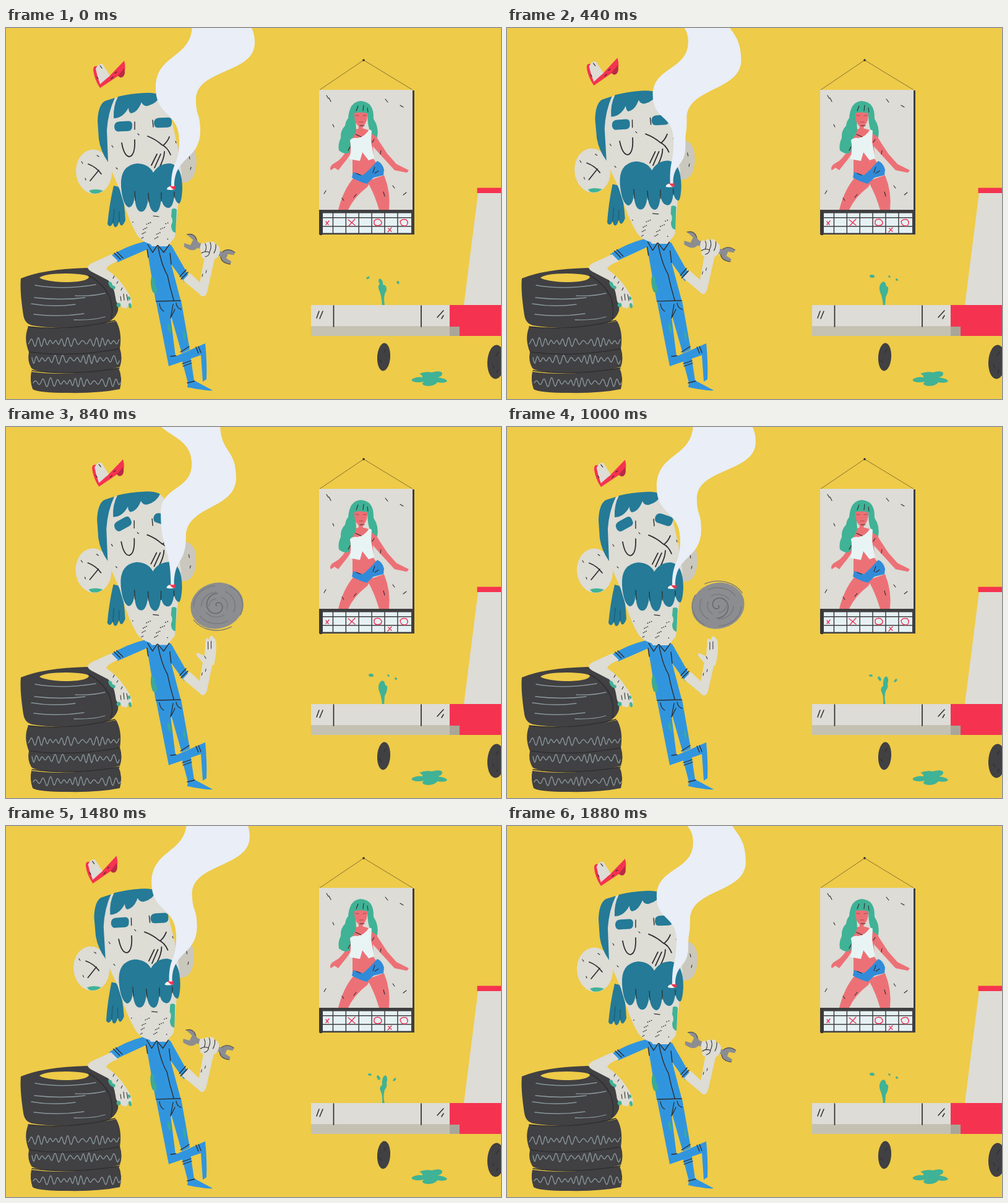
An HTML page with a canvas that plays this animation: 800x600 px, repeating every 1920 ms.

```html
<!DOCTYPE html>
<html lang="en">
<head>
<meta charset="utf-8">
<title>Garage break</title>
<style>
html, body { margin: 0; width: 100%; height: 100%; overflow: hidden; background: #eecb48; }
canvas { display: block; width: 800px; height: 600px; }
</style>
</head>
<body>
<canvas id="stage" width="800" height="600"></canvas>
<script>
const ctx = document.getElementById('stage').getContext('2d');
const LOOP = 1920, STEP = 40, LEAD = 8;
const BG = '#eecb48', INK = '#2e2d30', SKIN = '#dddcd5', HAIR = '#247a97', BLUE = '#3195de',
  RED = '#f53350', GREEN = '#40b296', TIRE = '#414042', CHALK = '#87969a', STEEL = '#8c8d90',
  SMOKE = '#e9eef7', PINK = '#ec7176', CELL = '#e6f1f3';

const fill = (c, d) => { ctx.fillStyle = c; ctx.fill(new Path2D(d)); };
const line = (c, w, d) => { ctx.strokeStyle = c; ctx.lineWidth = w; ctx.stroke(new Path2D(d)); };
const rect = (c, x, y, w, h) => { ctx.fillStyle = c; ctx.fillRect(x, y, w, h); };
function oval(c, x, y, rx, ry, a = 0) {
  ctx.fillStyle = c;
  ctx.beginPath();
  ctx.ellipse(x, y, rx, ry, a, 0, Math.PI * 2);
  ctx.fill();
}
function group(draw) { ctx.save(); draw(); ctx.restore(); }
function spin(x, y, a) { ctx.translate(x, y); ctx.rotate(a); ctx.translate(-x, -y); }

// keys: [time, ...values], eased between neighbours
function track(keys, t, smooth) {
  if (t <= keys[0][0]) return keys[0].slice(1);
  for (let i = 1; i < keys.length; i++) {
    const a = keys[i - 1], b = keys[i];
    if (t <= b[0]) {
      let u = (t - a[0]) / (b[0] - a[0]);
      if (smooth) u = u * u * (3 - 2 * u);
      return a.slice(1).map((v, j) => v + (b[j + 1] - v) * u);
    }
  }
  return keys[keys.length - 1].slice(1);
}

function squiggle(y, x0, x1, seed) {
  ctx.strokeStyle = CHALK;
  ctx.lineWidth = 1.4;
  ctx.beginPath();
  for (let x = x0; x <= x1; x++) {
    const amp = 5 + 2.5 * Math.sin(x * 0.13 + seed);
    ctx.lineTo(x, y + amp * Math.sin(x * 0.6 + 1.5 * Math.sin(x * 0.07 + seed)));
  }
  ctx.stroke();
}

function tires() {
  fill(TIRE, 'M41 556Q100 564 182 550Q189 566 184 584Q150 591 100 590Q52 590 43 584Q38 570 41 556Z');
  fill(TIRE, 'M36 483Q100 491 178 474Q188 492 184 518Q189 534 184 548Q150 558 100 558Q48 557 41 550Q34 538 37 524Q28 502 36 483Z');
  fill(TIRE, 'M24 405Q60 390 130 388Q150 390 165 407Q184 432 181 457Q176 475 150 481Q90 489 42 481Q30 478 28 464Q22 425 24 405Z');
  line('#2f2e30', 1.6, 'M36 483Q100 491 176 473M39 524Q105 533 183 519M42 554Q105 563 183 550');
  fill(BG, 'M54 404Q62 397 97 397Q134 398 134 403Q130 411 94 411Q65 410 54 404Z');
  line('#2f2e30', 1.5, 'M134 400Q158 414 168 436Q174 455 170 470');
  line(CHALK, 1.3, 'M47 416Q92 424 145 415M46 436Q90 441 128 436M112 433Q140 434 160 429M41 446Q75 452 112 447M45 463Q85 468 126 462M110 472Q140 473 160 467');
  squiggle(508, 36, 183, 1);
  squiggle(536, 42, 183, 3);
  squiggle(573, 44, 185, 5);
}

function calendar() {
  line('#7b6831', 0.9, 'M507 100L578 52L657 100');
  oval(INK, 578, 52, 1.8, 1.8);
  rect('#3f3e40', 507, 101, 153, 233);
  rect('#dddcd6', 506, 100, 151, 194);
  fill(PINK, 'M556 184Q551 202 538 214L527 221Q522 227 525 230L531 226L537 230L544 221Q558 205 563 190Z');
  fill(PINK, 'M562 242Q545 262 537 294L553 294Q562 274 584 257L590 246Z');
  fill(PINK, 'M588 246L611 238Q622 265 619 294L603 294Q596 270 586 252Z');
  fill(PINK, 'M586 164Q596 168 601 180L616 203L631 220L651 230L648 234L628 230L606 206L590 188Z');
  fill(PINK, 'M560 166Q575 158 592 168L594 212L600 220L580 245L560 236L560 208Z');
  fill(GREEN, 'M573 118Q555 119 553 146Q549 150 548 158Q540 166 541 178Q536 188 538 198Q548 206 555 201Q558 188 556 182Q563 176 566 165L565 146L584 138Q584 160 590 170L600 177Q603 160 594 147Q595 119 573 118Z');
  fill('#e8f4f4', 'M556 181Q562 176 568 178Q580 176 587 164L591 166L590 184L595 211L586 214L576 201L572 215L555 212Q559 196 556 181Z');
  fill('#328bd8', 'M561 233L577 238L588 228L600 215Q608 218 611 229L610 238L594 242L583 252Q569 248 559 242Z');
  fill(PINK, 'M563 135L584 136Q585 152 577 159L576 166L569 166L570 159Q562 153 563 135Z');
  fill(GREEN, 'M561 138Q570 119 587 139Q574 134 561 138Z');
  line('#a8464c', 1.1, 'M565 141L570 142M577 142L582 141M571 152L577 152');
  line(INK, 1.1, 'M572 158L579 158M565 172L574 176M596 225L593 234M596 235L602 231M566 235L573 238M606 198L605 204M595 180L592 185M556 192L553 198M578 125L577 134M569 126L566 134M584 129L585 136');
  line(INK, 1.1, 'M518 109L521 114M522 113L525 119M613 115L617 120M637 125L642 128M514 268L517 263M642 270L647 266M528 156L530 160M625 255L628 259M543 275L546 279M610 265L612 272M566 269L562 274');
  rect('#3f3e40', 506, 294, 154, 40);
  rect('#39383a', 507, 294, 4, 41);
  rect(CELL, 512, 299.5, 143, 32);
  for (let i = 0; i < 6; i++) rect('#3f3e40', 527.7 + i * 20.9, 299, 1.5, 33);
  for (const y of [306, 320]) rect('#3f3e40', 512, y, 143, 1.5);
  line('#e8395c', 1.5, 'M517 313L521 318M522 312L517 318M553 310L564 319M564 309L554 320M618 324L623 329M623 323L617 330');
  line('#e8395c', 1.5, 'M595 312Q598 308 604 310Q609 314 606 318Q599 322 595 317Z M637 313Q640 308 647 310Q652 316 646 320Q638 321 637 313Z');
}

function car() {
  fill('#dddcd6', 'M763 266H800V448H740Z');
  rect(RED, 761.5, 258.5, 39, 8.5);
  rect('#dddcd6', 493, 448, 225, 35);
  rect('#c4c1b2', 493, 483, 225, 15);
  fill(RED, 'M717 448H800V498H733V483H717Z');
  rect('#a9a699', 717, 483, 16, 15);
  rect('#c8c5b8', 493, 482, 224, 1);
  line(INK, 1.7, 'M529.5 449V483M671 449V483');
  line(INK, 1.5, 'M506 458L502 469M512 458L507 470M707 457L697 468M707 465L704 470');
  oval(TIRE, 610.5, 532, 10.5, 22.5, 0.06);
  oval(TIRE, 792, 540, 14, 27.5, 0.05);
  line(INK, 1.2, 'M614 520L611 525M604 537L607 541M796 524L792 530M786 545L789 550M795 553L793 558');
  fill(GREEN, 'M668 559Q678 555 688 557Q702 553 705 558Q706 563 698 565Q712 567 713 571Q710 575 697 573Q694 578 684 579Q672 579 673 574Q680 571 668 573Q654 573 656 568Q664 563 673 565Q674 562 668 559Z');
}

function spurt(t) {
  const p = t % 240;
  if (p < 40) {
    fill(GREEN, 'M608 449Q607 432 603 424Q600 417 604 414Q600 407 604 405Q610 408 609 415Q616 416 615 424Q609 433 612 449Z');
    oval(GREEN, 585, 404, 2.8, 1.8, -0.5);
    oval(GREEN, 633.5, 411.5, 2, 2.6, -0.3);
  } else if (p < 120) {
    fill(GREEN, 'M608 449Q609 434 605 428Q603 421 608 419Q607 405 613 403Q618 406 615 416Q617 420 612 427Q609 437 612 449Z');
    oval(GREEN, 588, 402, 3, 1.7, 0.2);
    oval(GREEN, 602, 407, 2.3, 4, -0.5);
    oval(GREEN, 628, 410, 3.2, 1.8, -0.9);
  } else {
    fill(GREEN, 'M608 449Q607 436 603 427Q600 418 605 412Q609 408 612 413Q612 418 616 419Q617 426 612 435L611 449Z');
    oval(GREEN, 590, 401.5, 4, 2.4, 0.1);
    oval(GREEN, 618, 402, 2, 1.5, 0.8);
    oval(GREEN, 630, 407, 2.2, 1.7, 0.7);
  }
}

function legs() {
  fill(BLUE, 'M264 441L283 441L297 520L284 526L268 470Z');
  fill(BLUE, 'M284 536L298 530L304 570L334 586Q330 588 293 581L294 574Z');
  fill(BLUE, 'M242 440H272L266 468L274 531L322 510Q325 540 324 568L318 572L315 529L263 547Z');
  line(INK, 1.3, 'M285 543L299 538M286 547L300 542M307 516L311 526M311 515L315 525M293 574L305 571M248 446Q249 455 255 458M275 445Q276 453 283 455M270 447L266 469L273 455M296 515L282 524M266 531L275 530');
  fill('#3caa96', 'M287 488Q291 494 290 506Q285 500 287 488Z');
  fill('#3caa96', 'M261 478Q268 480 266 494Q260 490 261 478Z');
}

function torso(k) {
  ctx.translate(0, 445);
  ctx.transform(1, 0, 0.018 * k, 1 + 0.043 * k, 0, 0);
  ctx.translate(0, -445);
  fill(BLUE, 'M225 345Q245 353 267 351L296 402L288 411L267 382L283 443H242L228 358L180 379L168 369Q195 352 225 345Z');
  fill(SKIN, 'M226 340L268 344L262 353L236 353Z');
  fill(BLUE, 'M227 345L236 362L246 351L258 363L265 350L271 358L268 375L240 372Z');
  line(INK, 1.4, 'M229 350L237 363L245 351L255 363L264 350M246 355Q252 385 261 400Q265 420 271 440M243 442L282 441M175 364L185 374M179 362L189 372M294 395L283 406M291 391L281 402M267 382L265 364M228 358L230 371');
  fill('#3caa96', 'M235 402Q242 404 240 413Q247 422 242 430L237 427Q232 414 235 402Z');
}

function leftArm() {
  fill(SKIN, 'M170 366L181 377Q164 383 162 390Q182 403 194 423Q206 440 203 451Q200 456 197 447Q196 457 191 452Q187 455 184 445Q178 448 177 436Q174 416 165 408L138 394Q126 387 139 380Z');
  fill(GREEN, 'M165 411Q171 409 172 416Q180 418 175 423Q166 420 165 411Z');
  oval(GREEN, 200.5, 449, 2.3, 4.2, -0.2);
  oval(GREEN, 182, 448, 3.3, 3.6, 0);
  oval(GREEN, 199, 437, 2, 3, -0.4);
  line(INK, 1.1, 'M175 401L173 405M181 410L179 413M188 420L186 424M190 430L191 440M195 431L197 441M185 434L186 441');
}

function wrench() {
  ctx.scale(0.95, 0.92);
  fill(STEEL, 'M-45 -10Q-34 -18 -26 -7L-21 -4L22 -4Q28 -15 42 -11L42 -6L32 -4L32 4L42 6L42 11Q27 15 22 5L-20 5Q-25 17 -42 12L-44 6L-33 5L-32 -5Z');
  line('#4c4c50', 1.2, 'M-45 -10Q-34 -18 -26 -7M22 -4Q28 -15 42 -11M22 5Q27 15 42 11M-17 0L-7 0');
}

function blur(y, a) {
  ctx.translate(341, y);
  oval(STEEL, 0, 0, 43, 37, -0.25);
  ctx.rotate(a);
  ctx.strokeStyle = '#77797c';
  ctx.lineWidth = 1.4;
  for (let i = 0; i < 9; i++) {
    const r = 13 + i * 4.1, s = i * 2.1;
    ctx.beginPath();
    ctx.ellipse(0, 0, r, r * 0.87, 0, s, s + 1.5);
    ctx.stroke();
  }
  ctx.strokeStyle = '#626468';
  ctx.beginPath();
  for (let i = 0; i < 34; i++) {
    const s = i * 0.24, r = 0.5 + i * 0.6;
    ctx.lineTo(r * Math.cos(s), r * Math.sin(s));
  }
  ctx.stroke();
}

const SWING = [[580, 0], [680, 0.135], [740, -0.02], [1060, 0], [1110, 0.07], [1160, 0.04], [1240, 0]];
const THROW = 740, CATCH = 1100;

function rightArm(t, k) {
  const [a] = track(SWING, t, true);
  const free = t > THROW && t < CATCH;
  group(() => {
    ctx.translate(-1.6 * k, -4 * k);
    fill(SKIN, 'M286 408L297 396L314 412L322 426Q325 434 317 434Z');
    spin(318, 430, a);
    if (!free) group(() => {
      ctx.translate(329, 358);
      ctx.rotate(0.37 + a * 0.25);
      wrench();
    });
    fill(SKIN, 'M311 424L321 370L338 370L325 427Q321 438 314 432Z');
    if (free) {
      fill(SKIN, 'M320 383L310 371Q307 365 312 366L322 371L324 344Q327 340 330 345L331 340Q335 336 337 342Q341 342 341 352Q342 366 337 386Z');
      line(INK, 1, 'M328 348L328 360M333 347L333 359M322 371L324 375');
    } else {
      fill(SKIN, 'M314 352Q316 345 322 349Q325 343 330 347Q336 343 339 350Q346 352 346 361Q345 370 337 374L322 374Q313 371 316 364Q312 358 314 352Z');
      line(INK, 1.1, 'M322 349Q325 354 322 361M330 347Q333 354 329 362M339 350Q340 357 336 364M316 364Q322 360 329 363Q328 369 322 370');
    }
    line(INK, 1, 'M318 398L317 402M324 392L323 396');
  });
  if (free) group(() => {
    const u = (t - THROW) / (CATCH - THROW);
    blur(350 - 304 * u * (1 - u), (t - 1000) * 0.02);
  });
}

// Wave crests by age; each rises along the plume and leaves at the top.
const R_OUT = [[-1, 293, 196], [0, 314, 165], [2, 347, 132], [5, 386, 58], [6, 402, 24], [8, 430, -30], [12, 440, -150]];
const R_IN = [[-3, 287, 206], [-1, 296, 152], [0, 307, 116], [2, 332, 65], [5, 355, -40], [12, 360, -220]];
const L_IN = [[-1, 274, 184], [0, 280, 182], [2, 302, 128], [5, 301, 26], [6, 301, -6], [12, 310, -150]];
const L_OUT = [[-3, 260, 165], [-1, 242, 114], [0, 242, 97], [2, 241, 32], [4, 236, -35], [12, 230, -240]];

function edge(base, first, second, phase) {
  const pts = [base];
  for (const age of [phase - 6, phase, phase + 6])
    for (const keys of [first, second])
      if (age >= keys[0][0]) pts.push(track(keys, age));
  return pts;
}
function trace(pts) {
  for (let i = 1; i < pts.length; i++) {
    const [x0, y0] = pts[i - 1], [x1, y1] = pts[i], d = (y1 - y0) * 0.55;
    ctx.bezierCurveTo(x0, y0 + d, x1, y1 - d, x1, y1);
  }
}

function smoke(t) {
  const phase = Math.floor(t % 480 / 80);
  const left = edge([267, 256], L_IN, L_OUT, phase);
  const right = edge([272, 256], R_OUT, R_IN, phase);
  ctx.fillStyle = SMOKE;
  ctx.beginPath();
  ctx.moveTo(...left[0]);
  trace(left);
  right.reverse();
  ctx.lineTo(...right[0]);
  trace(right);
  ctx.closePath();
  ctx.fill();
}

function brow(x, y, a) {
  group(() => {
    ctx.translate(x, y);
    ctx.rotate(a);
    fill(HAIR, 'M-15 1Q-15 -8 -6 -8L8 -8Q15 -8 14 0Q14 8 7 8L-7 8Q-14 9 -15 1Z');
  });
}

function hat() {
  fill(RED, 'M141 68Q141 60 148 62L152 82L165 80L191 53Q195 66 189 77Q186 82 182 77L152 97Q143 84 141 68Z');
  fill('#b92a44', 'M191 65Q194 74 189 79Q184 82 181 77Z');
  fill(SKIN, 'M145 66Q149 57 156 58L168 77L152 91Q147 78 145 66Z');
  line(INK, 1.2, 'M147 79L149 82M152 61L155 65M176 73L179 71M173 79L170 82');
}

function head(t, k) {
  const [sad] = track([[540, 0], [640, 1], [1200, 1], [1320, 0]], t, true);
  ctx.translate(-1.6 * k, -4 * k);
  spin(240, 345, -0.021 * k);
  group(() => { ctx.translate(-5 * k, -2 * k); hat(); });

  fill('#cac7bd', 'M278 192Q297 179 306 200Q311 222 303 240Q296 252 282 250Z');
  fill(HAIR, 'M174 255Q167 285 164 317Q168 325 173 315Q175 326 180 320L183 313Q186 327 193 311Q192 285 186 258Z');
  line('#1d5b74', 1.2, 'M175 293L173 315M183 297L183 313');
  oval(SKIN, 142, 232.5, 29, 36, -0.08);
  fill(GREEN, 'M134 263Q144 259 157 263Q148 270 138 267Z');
  fill(SKIN, 'M150 132Q158 114 200 108Q232 104 248 108Q263 118 267 146L277 190L284 235Q277 296 273 338Q266 352 242 351Q222 349 212 335Q198 312 184 262Q172 235 160 205Z');
  line(INK, 1.7, 'M133 220Q146 225 154 236M136 247L150 230');
  line(INK, 1.1, 'M122 216L124 219M128 243L129 246M147 206L150 208M296 207L297 212M299 225L298 229');
  fill(HAIR, 'M148 150Q149 124 160 118L176 113Q165 136 163 165L165 217Q153 200 150 180Z');
  fill(HAIR, 'M181 111Q173 126 174 146Q189 146 198 129Q198 136 202 138Q213 136 219 120Q222 127 229 126Q244 122 250 109Q240 104 224 105Q201 106 181 111Z');

  brow(190, 159 - 2 * sad, -0.05 - 0.45 * sad);
  brow(254, 153 - 3 * sad, -0.03 + 0.36 * sad);
  line(INK, 1.4, 'M208 152L208 164M237 149L238 160');
  line(INK, 1.8, 'M187 186Q191 208 200 208Q209 205 208 181');
  line(INK, 1.8, 'M229 175Q242 180 252 189Q261 193 266 205M264 176Q261 184 254 190M256 200Q256 211 247 227M244 204L235 222M250 204L240 226');
  line(INK, 1.1, 'M171 190L173 193M178 226L180 228M213 171L215 173M274 183L275 186');

  fill(GREEN, 'M268 293Q273 290 276 294L274 331Q267 330 267 319Q271 311 267 305Z');
  fill(HAIR, 'M186 256Q184 222 212 219Q231 220 238 234Q247 219 265 219Q285 222 285 260Q284 281 280 284Q274 283 272 271Q270 291 262 291Q253 290 251 275Q249 298 241 298Q232 296 230 276Q227 298 218 297Q209 296 208 272Q206 290 198 290Q188 285 186 256Z');
  line(INK, 1.2, 'M208 264L209 279M230 267L231 281M251 266L251 280M272 265L272 274M238 304L247 305');
  for (let i = 0; i < 24; i++) {
    const y = 314 + i * 0.755 % 1 * 32;
    const x = 205 + (y - 314) * 0.5 + i * 0.618 % 1 * (60 - (y - 314) * 0.6);
    oval(INK, x, y, 1, 0.8);
  }
  fill('#f4f4f2', 'M260 260Q261 257 268 255L273 261Q266 263 260 261Z');
  fill(RED, 'M265 256Q269 250 274 256L274 261L270 261Z');
  smoke(t);
}

function draw(t) {
  const k = (1 - Math.cos(t / 960 * Math.PI * 2)) / 2;
  ctx.lineCap = ctx.lineJoin = 'round';
  rect(BG, 0, 0, 800, 600);
  calendar();
  spurt(t);
  car();
  tires();
  legs();
  group(() => torso(k));
  leftArm();
  rightArm(t, k);
  group(() => head(t, k));
}

const start = performance.now();
function frame() {
  const t = (performance.now() - start + LEAD) % LOOP;
  draw(Math.floor(t / STEP) * STEP);
  requestAnimationFrame(frame);
}
frame();
</script>
</body>
</html>
```
